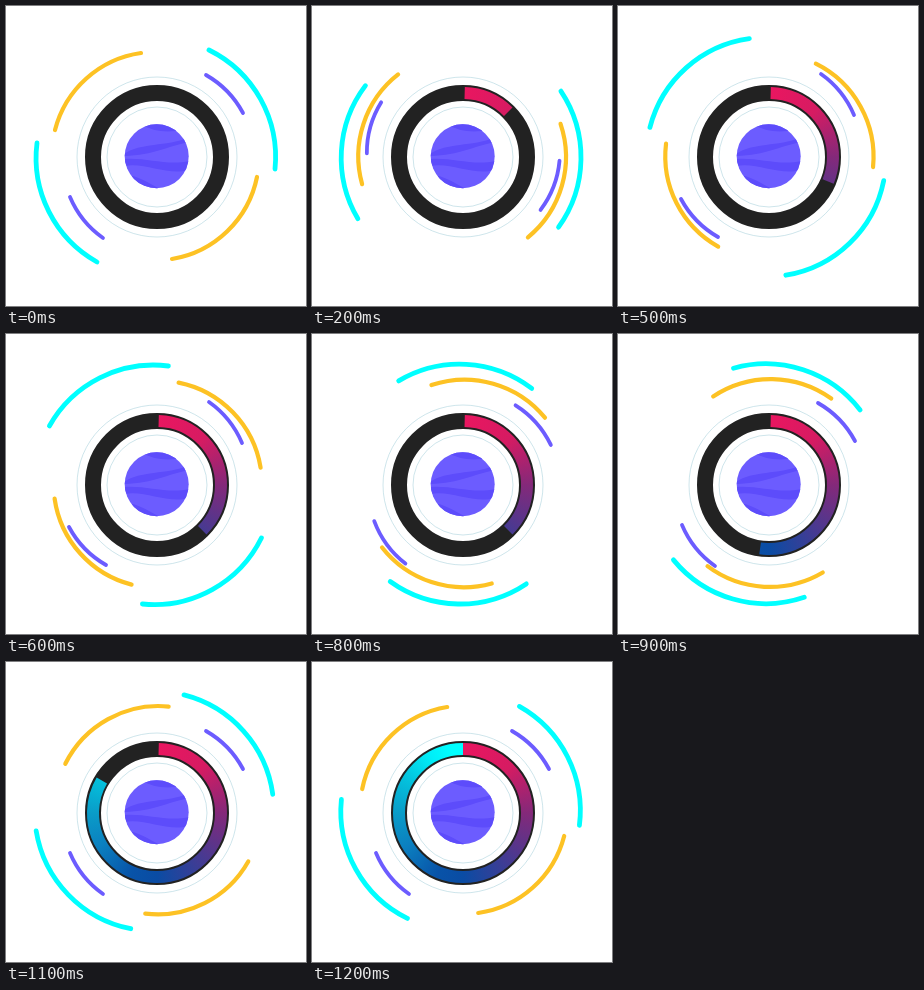
Animation, 300 px wide and 300 px high, one loop 1300 ms. Source, as an HTML page with a canvas:

```html
<!DOCTYPE html>
<html lang="en">
<head>
<meta charset="utf-8">
<title>Loader</title>
<style>
html, body { margin: 0; width: 100%; height: 100%; overflow: hidden; background: #fff; }
canvas { display: block; }
</style>
</head>
<body>
<canvas id="stage" width="300" height="300"></canvas>
<script>
const ctx = document.getElementById('stage').getContext('2d');
const LOOP = 1300, STEP = 100, RAD = Math.PI / 180;
const CX = 151, CY = 151;

// Each orbit is a pair of opposite arcs turning around its own pivot.
const cyan = {
  path: new Path2D('M203 44A119.5 119.5 0 0 1 269 163M91 256A119.5 119.5 0 0 1 31 137'),
  pivot: [149.2, 150.2], color: '#00ffff', width: 4.8
};
const yellow = {
  path: new Path2D('M49 124A104 104 0 0 1 135 47M251 171A104 104 0 0 1 166 253'),
  pivot: [150.6, 149], color: '#fdc224', width: 4.2
};
const violet = {
  path: new Path2D('M200 69A96 96 0 0 1 237 107M97 232A96 96 0 0 1 64 191'),
  pivot: [150, 150], color: '#6c5cff', width: 3.8
};

const stripes = new Path2D(
  'M134 118Q155 130 179 123L170 115Z' +
  'M118 148C135 136 160 141 184 131L184 136C160 140 150 149 118 150Z' +
  'M118 153C140 151 160 160 184 155L184 164C160 170 140 156 118 160Z' +
  'M118 168C135 171 142 177 156 184L125 184Z');

const rainbow = ctx.createConicGradient(-Math.PI / 2, CX, CY);
[[0, '#ea1660'], [45, '#d61b62'], [90, '#84297a'], [135, '#463a92'],
 [180, '#0a4ca4'], [203, '#0853a8'], [240, '#0b80c0'], [270, '#0a9cc8'],
 [300, '#04c0dc'], [330, '#00eef8'], [350, '#00ffff'], [360, '#00ffff']]
  .forEach(([deg, color]) => rainbow.addColorStop(deg / 360, color));

const clamp = u => Math.min(1, Math.max(0, u));
const easeInOut = u => u < .5 ? 4 * u ** 3 : 1 - 4 * (1 - u) ** 3;
const spin = (t, start, length) => -180 * easeInOut(clamp((t - start) / length));

// Ring fill in degrees at every 200 ms, linear in between.
const fills = [0, 45, 90, 135, 135, 241, 360];
function fillAt(t) {
  const i = Math.min(5, Math.floor(t / 200));
  return fills[i] + (fills[i + 1] - fills[i]) * (t / 200 - i);
}

function ring(r, width, color, from = 0, to = 360) {
  ctx.beginPath();
  ctx.arc(CX, CY, r, (from - 90) * RAD, (to - 90) * RAD);
  ctx.lineWidth = width;
  ctx.strokeStyle = color;
  ctx.stroke();
}

function orbit({ path, pivot: [x, y], color, width }, deg) {
  ctx.save();
  ctx.translate(x, y);
  ctx.rotate(deg * RAD);
  ctx.translate(-x, -y);
  ctx.lineCap = 'round';
  ctx.lineWidth = width;
  ctx.strokeStyle = color;
  ctx.stroke(path);
  ctx.restore();
}

function planet() {
  ctx.save();
  ctx.beginPath();
  ctx.arc(150.7, 150.3, 32, 0, 2 * Math.PI);
  ctx.fillStyle = '#6c5cff';
  ctx.fill();
  ctx.clip();
  ctx.fillStyle = '#5d4cfb';
  ctx.fill(stripes);
  ctx.restore();
}

function draw(t) {
  ctx.fillStyle = '#fff';
  ctx.fillRect(0, 0, 300, 300);
  ring(80, .5, '#9ccbd6');
  ring(50, .5, '#9ccbd6');
  ring(64, 16, '#222');
  const fill = fillAt(t);
  if (fill > 0) ring(64, 12, rainbow, fill < 360 ? 1.5 : 0, fill);
  planet();
  orbit(cyan, t * .15);
  orbit(yellow, t * -.15);
  orbit(violet, spin(t, 0, 355) + spin(t, 600, 236));
}

const begin = performance.now();
function tick() {
  const t = (performance.now() - begin) % LOOP;
  draw(Math.floor(t / STEP) * STEP);
  requestAnimationFrame(tick);
}
tick();
</script>
</body>
</html>
```
